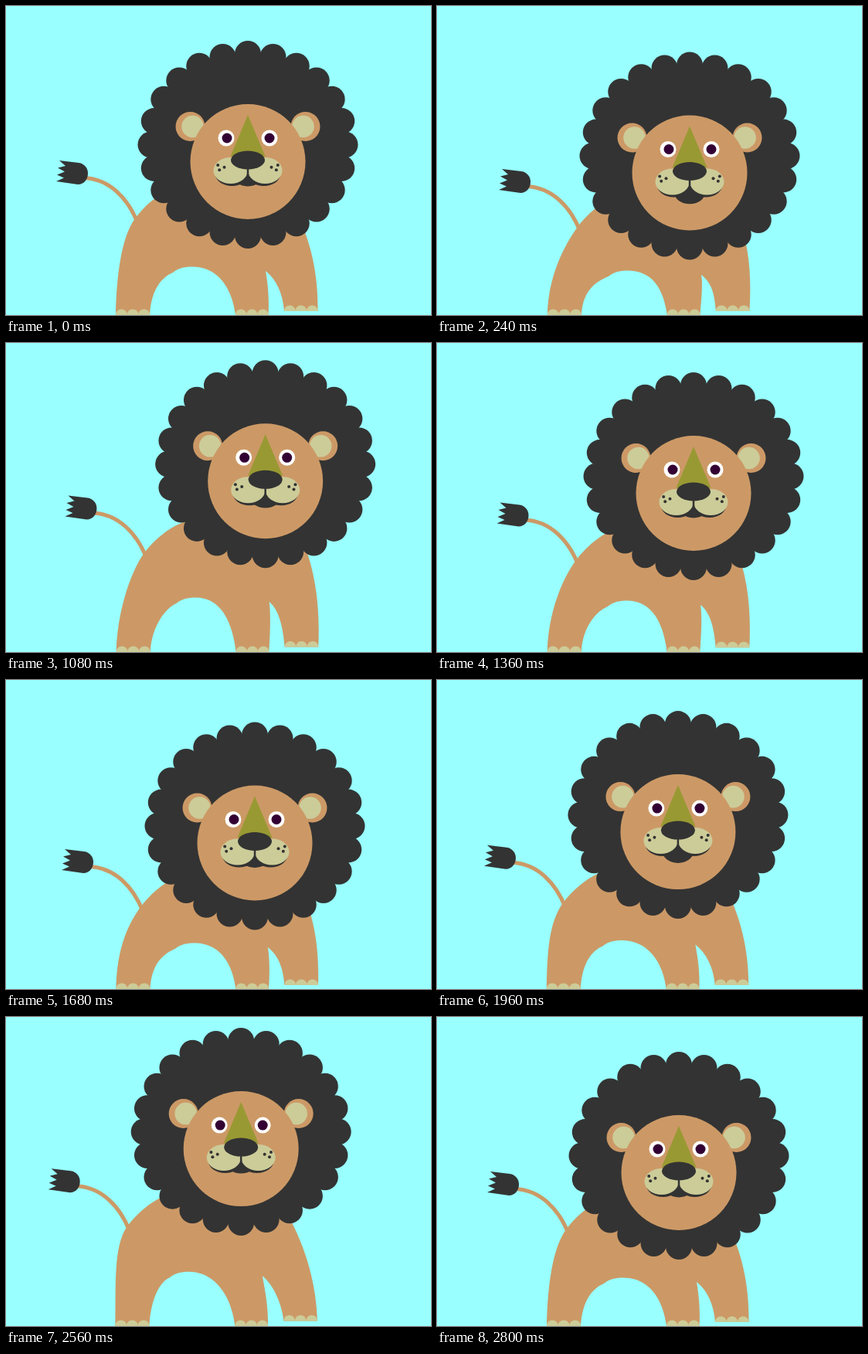
Recreate the animation shown at these times as an HTML page. Size 550 px wide and 400 px high, loop 2.84 s.

```html
<!DOCTYPE html>
<html lang="en">
<head>
<meta charset="utf-8">
<title>Lion</title>
<style>
html, body { margin: 0; width: 100%; height: 100%; overflow: hidden; background: #9ff; }
svg { display: block; width: 550px; height: 400px; }
.fur { fill: #c96; }
.dark { fill: #333; }
.pale { fill: #cc9; }
.white { fill: #fff; }
.pupil { fill: #303; }
</style>
</head>
<body>
<svg viewBox="0 0 550 400">
  <rect width="550" height="400" fill="#9ff"/>
  <g id="tail">
    <path d="M36 7C70 8.500 93 34.500 105 64.500" fill="none" stroke="#c96" stroke-width="5"/>
    <path class="dark" d="M4-15.500L29-12.500C37-11.500 41-5 41 1C41 9 36 15.500 28 15.500L0 11.500L10 7L1 3L11-1L2-6L12-8.500Z"/>
  </g>
  <path id="body" class="fur"/>
  <path id="toes" class="pale"/>
  <g id="head">
    <g id="mane" class="dark"><ellipse cy="-22" rx="127" ry="119"/></g>
    <circle class="fur" cx="-74.500" cy="-45.500" r="19"/>
    <circle class="fur" cx="74.500" cy="-45.500" r="19"/>
    <circle class="pale" cx="-71.500" cy="-45.500" r="14.300"/>
    <circle class="pale" cx="71.500" cy="-45.500" r="14.300"/>
    <circle class="fur" r="74.500"/>
    <path d="M0-60.500L22.500-7H-22.500Z" fill="#993"/>
    <g class="dark">
      <ellipse id="jaw" rx="20" ry="15"/>
      <ellipse cx="-20.500" cy="15" rx="22" ry="16.500"/>
      <ellipse cx="20.500" cy="15" rx="22" ry="16.500"/>
    </g>
    <g id="muzzle"></g>
    <path d="M0 0V20" stroke="#333" stroke-width="2.500"/>
    <ellipse class="dark" cy="-2" rx="22" ry="12"/>
    <circle class="white" cx="-28" cy="-30.500" r="10.500"/>
    <circle class="white" cx="28" cy="-30.500" r="10.500"/>
    <circle class="pupil" cx="-27" cy="-30.500" r="6.500"/>
    <circle class="pupil" cx="28" cy="-30.500" r="6.500"/>
  </g>
</svg>
<script>
const LOOP = 2840, STEP = 40, SPAN = 2800;
const $ = id => document.getElementById(id);

// time, head x, head y, tail x, tail y, belly y
const poses = [
  [0, 313, 201.5, 65, 215.5, 337.5],
  [240, 327, 216, 80, 226.5, 342.5],
  [560, 336, 191, 78, 219, 335],
  [760, 336, 190.5, 77.5, 216.5, 332.5],
  [1000, 336, 178, 76.5, 212, 329],
  [1120, 335.3, 180.5, 76.5, 214, 330],
  [1360, 332, 194.5, 77.5, 222, 333.5],
  [1680, 322, 211, 72, 234.5, 340.5],
  [2240, 302, 177, 49.5, 221, 332],
  [2320, 301, 174.5, 50, 219.5, 331.5],
  [2480, 302, 163.5, 52, 212, 328]
];

// closed loop: indexes outside the table wrap with shifted time
function pose(i) {
  const n = poses.length, turn = Math.floor(i / n);
  const [t, ...v] = poses[i - turn * n];
  return [t + turn * SPAN, ...v];
}

// cubic Hermite interpolation through the poses
function sample(t) {
  let i = 0;
  while (pose(i + 1)[0] <= t) i++;
  const [a, b, c, d] = [-1, 0, 1, 2].map(k => pose(i + k));
  const h = c[0] - b[0], u = (t - b[0]) / h;
  return b.slice(1).map((p, k) => {
    const j = k + 1, q = c[j];
    const m = (q - a[j]) / (c[0] - a[0]) * h;
    const n = (d[j] - p) / (d[0] - b[0]) * h;
    return p + u * (m + u * (3 * (q - p) - 2 * m - n + u * (2 * (p - q) + m + n)));
  });
}

const ramp = (t, a, b) => Math.min(1, Math.max(0, (t - a) / (b - a)));
const mouth = t => ramp(t, 80, 200) - ramp(t, 1000, 1120) + ramp(t, 1720, 1840) - ramp(t, 2440, 2560);

function add(parent, tag, cls, attrs) {
  const el = document.createElementNS("http://www.w3.org/2000/svg", tag);
  el.setAttribute("class", cls);
  for (const k in attrs) el.setAttribute(k, attrs[k]);
  parent.append(el);
}

for (let i = 0; i < 24; i++) {
  const a = i * Math.PI / 12;
  add($("mane"), "circle", "dark", { cx: 125.5 * Math.sin(a), cy: -22 - 117.5 * Math.cos(a), r: 17 });
}
for (const s of [-1, 1]) {
  add($("muzzle"), "ellipse", "pale", { cx: 22.3 * s, cy: 11.5, rx: 22.2, ry: 17 });
  for (const [x, y] of [[38.8, 4.5], [30.5, 7.2], [36.8, 10.7]])
    add($("muzzle"), "circle", "dark", { cx: x * s, cy: y, r: 2 });
}

function foot(x, w, y, base) {
  const arc = `a${w / 6} 7 0 0 1 ${w / 3} 0`;
  return `M${x} ${base}V${y}${arc}${arc}${arc}V${base}Z`;
}

function bodyPath(tx, ty, by, lean, sole) {
  const d = tx - 65, e = by - 337.5, m = 0.4 * d;
  const rx = tx + 102, ry = ty + 59.5;
  const jx = 336 + m, jy = 343 + e;
  const l = 142 + lean, r = 360 + lean;
  return `M${l} 400C${l + 1} 350 ${rx - 18} ${ry + 25} ${rx} ${ry}` +
    `C${rx + 12} ${ry - 16} ${rx + 28} ${ry - 30} ${rx + 45} ${ry - 38}` +
    `L${rx + 75} ${ry - 50}L${373 + 0.9 * d} ${262 + e}` +
    `C${396 + 0.6 * d} ${305 + e / 2} ${404 + 0.2 * d} 350 ${r + 43.5} ${sole}` +
    `H${r}C${r - 2} 372 ${jx + 14} ${jy + 11} ${jx} ${jy}` +
    `C${jx + 2} ${jy + 12} ${341 + m / 4} 375 ${339.5 + lean} 400` +
    `H${297 + lean}C${292 + lean} ${362 + e / 2} ${272 + m} ${by} ${241 + m} ${by}` +
    `C${233 + m} ${by} ${224 + m} ${by + 1} ${216 + m} ${by + 7.5}` +
    `C${203 + m} ${by + 13} ${188 + lean} 365 ${186 + lean} 400Z`;
}

function draw(t) {
  const [hx, hy, tx, ty, by] = sample(t);
  const lean = (tx - 65) * 0.06;
  const sole = 395 + Math.min(0, (by - 337.5) * 0.2);
  $("head").setAttribute("transform", `translate(${hx} ${hy})`);
  $("tail").setAttribute("transform", `translate(${tx} ${ty})`);
  $("jaw").setAttribute("cy", 17 + 8.3 * mouth(t));
  $("body").setAttribute("d", bodyPath(tx, ty, by, lean, sole));
  $("toes").setAttribute("d",
    foot(142 + lean, 44, 399.5, 402) +
    foot(297 + lean, 42.5, 399.5, 402) +
    foot(360 + lean, 43.5, sole - 0.5, sole));
}

const start = performance.now();
function tick() {
  const t = (performance.now() - start) % LOOP;
  draw(Math.floor(t / STEP) * STEP);
  requestAnimationFrame(tick);
}
tick();
</script>
</body>
</html>
```
